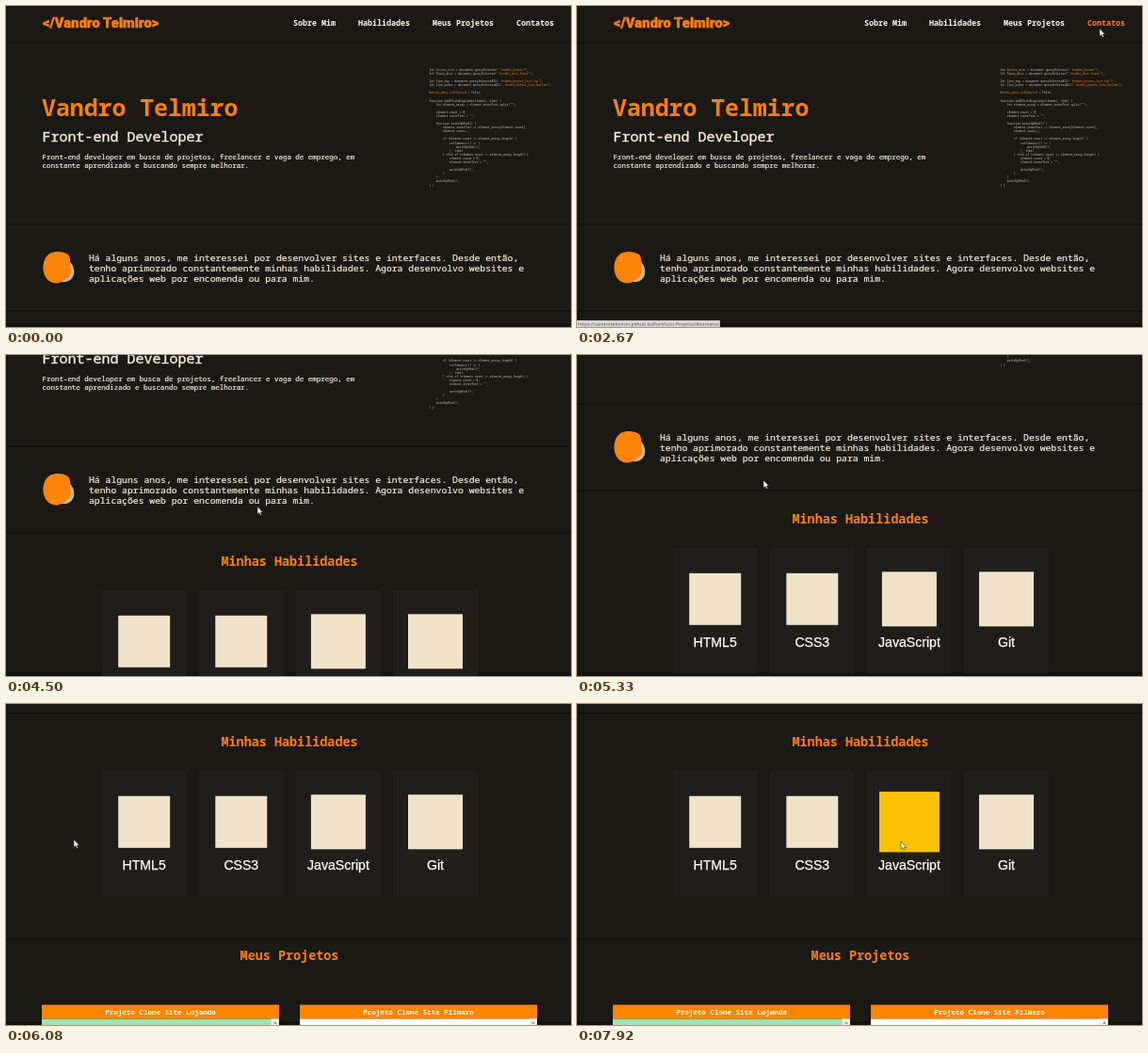
An HTML page that plays this animation: 600x341 px, repeating every 8 s.

```html
<!DOCTYPE html>
<html lang="pt-BR">
<head>
<meta charset="utf-8">
<title>Portfólio</title>
<style>
  html, body { margin: 0; width: 100%; height: 100%; overflow: hidden; background: #1a1914; }
  svg { display: block; width: 600px; height: 341px; }
  text { font-family: "Noto Sans Mono", monospace; fill: #f8ecd6; white-space: pre; }
  .logo { font: 900 14.6px Roboto, sans-serif; fill: #ff7f0a; stroke: #ff7f0a; stroke-width: .5; letter-spacing: .15px; }
  .nav text { font-size: 8.35px; font-weight: 700; fill: #fff8ea; }
  .nav .on { fill: #ff8110; }
  .name { font-size: 24.8px; font-weight: 600; fill: #ff7f0a; }
  .role, .desc, .about { stroke: #f8ecd6; stroke-width: .2; }
  .role { font-size: 15px; stroke-width: .4; }
  .desc { font-size: 7.48px; }
  .about { font-size: 9.75px; }
  .title { font-size: 13.45px; font-weight: 600; fill: #ff7f0a; text-anchor: middle; }
  .code text { font-size: 2.97px; fill: #c9c4b8; }
  .code .hot { fill: #e8872a; }
  .label { font: 14.1px "Liberation Sans", Arial, sans-serif; fill: #fff; stroke: #fff; stroke-width: .25; text-anchor: middle; }
  .bar { font-size: 7.55px; font-weight: 700; fill: #fff; text-anchor: middle; }
  .url { font: 5.2px "Open Sans", sans-serif; fill: #5c5c5c; }
  .rule { fill: #12110e; }
  .icon { transform-box: fill-box; transform-origin: center; }
</style>
</head>
<body>
<svg viewBox="0 0 600 341">
  <rect width="600" height="341" fill="#1a1914"/>
  <rect y="337" width="600" height="4" fill="#12110e"/>
  <g id="page">
    <rect class="rule" y="38" width="600" height="1.5"/>
    <rect class="rule" y="231" width="600" height="1.5"/>
    <rect class="rule" y="323" width="600" height="1.5"/>
    <rect class="rule" y="563" width="600" height="1.5"/>

    <text class="logo" x="39" y="23">&lt;/Vandro Telmiro&gt;</text>
    <g class="nav">
      <text x="305" y="21">Sobre Mim</text>
      <text x="374" y="21">Habilidades</text>
      <text x="453" y="21">Meus Projetos</text>
      <text x="542" y="21">Contatos</text>
    </g>

    <text class="name" x="38" y="116.5">Vandro Telmiro</text>
    <text class="role" x="38.5" y="144">Front-end Developer</text>
    <text class="desc" x="38.5" y="162.5">Front-end developer em busca de projetos, freelancer e vaga de emprego, em</text>
    <text class="desc" x="38.5" y="172">constante aprendizado e buscando sempre melhorar.</text>
    <g class="code" id="code"></g>

    <path fill="#bdb6a6" d="M50 268C57 264 67 268 71 276C74 283 72 291 64 293C54 294 45 289 45 280C45 275 46 271 50 268Z"/>
    <path fill="#ff840a" d="M47 262.5C53 260 61 260.5 66 264C70 269 67 275 69 281C69 287 64 290 58 293.5C51 296 45 293 42 288C38 281 38 268 47 262.5Z"/>
    <text class="about" x="88" y="270.7">Há alguns anos, me interessei por desenvolver sites e interfaces. Desde então,</text>
    <text class="about" x="88" y="281.9">tenho aprimorado constantemente minhas habilidades. Agora desenvolvo websites e</text>
    <text class="about" x="88" y="293.1">aplicações web por encomenda ou para mim.</text>

    <text class="title" x="301" y="358.7">Minhas Habilidades</text>
    <g id="skills"></g>
    <text class="title" x="301" y="585.7">Meus Projetos</text>
    <g id="projects"></g>
  </g>

  <g id="status">
    <rect y="334" height="7" fill="#d9d9d9"/>
    <text class="url" x="1" y="339.6"></text>
  </g>
  <g id="cursor" stroke="#222" stroke-width=".6" fill="#fff">
    <path id="arrow" d="M0 0V8.2L1.9 6.6L3.1 9.3L4.5 8.7L3.3 6.1H5.7Z"/>
    <path id="hand" d="M-.8 .6Q0 -.6 .8 .6V4L4.3 4.9Q5 5.2 4.8 6.4L4.1 10H-.6L-3 6.6Q-3.2 5.2 -2 5.6L-.8 6.6Z"/>
  </g>
</svg>
<script>
const NS = 'http://www.w3.org/2000/svg';
const $ = id => document.getElementById(id);

function add(parent, tag, attrs, text) {
  const el = document.createElementNS(NS, tag);
  for (const key in attrs) el.setAttribute(key, attrs[key]);
  if (text) el.textContent = text;
  return parent.appendChild(el);
}

// Code card
const code = `let botoes_menu = document.querySelector(".header_botoes");
let frase_desc = document.querySelector(".header_desc-frase");

let line_top = document.querySelectorAll(".header_botoes_line-top");
let line_under = document.querySelectorAll(".header_botoes_line-bottom");

botoes_menu.isSelected = false;

function addEfeitoDigitado(element, time) {
    let element_array = element.innerText.split("");

    element.count = 0;
    element.innerText = "";

    function writeUpHtml() {
        element.innerText += element_array[element.count];
        element.count++;

        if (element.count <= element_array.length) {
            setTimeout(() => {
                writeUpHtml();
            }, time)
        } else if (element.count >= element_array.length) {
            element.count = 0;
            element.innerText = "";

            writeUpHtml();
        }
    }
    writeUpHtml();
} }`;
code.split('\n').forEach((line, i) => {
  if (!line) return;
  const indent = line.search(/\S/);
  const text = add($('code'), 'text', { x: 449.5 + indent * 1.8, y: 68.8 + i * 4.09 });
  line.trim().split(/(botoes_menu\S*|"[^"]+")/).forEach((part, j) =>
    add(text, 'tspan', j % 2 ? { class: 'hot' } : {}, part));
});

// Skill cards: name, icon size, hover colour, hover start and end
const skills = [
  ['HTML5', 55, '#e8561f', 79, 88],
  ['CSS3', 55, '#2a78d0', 86, 94],
  ['JavaScript', 58, '#fdc203', 91, 110],
  ['Git', 58, '#e84e31', 200, 210],
].map(([name, size, color, from, to], i) => {
  const cx = 146.7 + i * 103.1;
  add($('skills'), 'rect', { x: cx - 45, y: 384.5, width: 90, height: 133.5, fill: '#1f1e1a' });
  const icon = add($('skills'), 'g', { class: 'icon' });
  const box = { x: cx - size / 2, y: 439.3 - size / 2, width: size, height: size };
  add(icon, 'rect', { ...box, fill: '#f0e3ca' });
  const tint = add(icon, 'rect', { ...box, fill: color });
  add($('skills'), 'text', { class: 'label', x: cx, y: 489.8 }, name);
  return { icon, tint, from, to };
});

// Project windows
[['Lojanda', 38, '#9fe3b4'], ['Filmaro', 312, '#fff']].forEach(([name, x, fill]) => {
  const g = add($('projects'), 'g', { transform: `translate(${x} 634)` });
  add(g, 'rect', { width: 252, height: 15, y: -.5, fill: '#ff8400' });
  add(g, 'text', { class: 'bar', x: 126, y: 10 }, `Projeto Clone Site ${name}`);
  add(g, 'rect', { y: 14.5, width: 252, height: 140, fill });
  add(g, 'rect', { x: 243.5, y: 14.5, width: 8.5, height: 140, fill: '#f1f1f1' });
  add(g, 'path', { d: 'M246 19.5l2 -2l2 2z', fill: '#777' });
});

// Timeline in ticks of 1/12 s
const RATE = 12, TICKS = 96;
const scrollKeys = [[43, 0], [45, 45], [49, 45], [50, 90], [52, 90], [54, 135],
  [56, 135], [58, 180], [66, 180], [68, 225], [69, 225], [73, 314]];
const cursorKeys = [[2, 212, 180], [6, 446, 96], [11, 338, 20], [13, 336, 21],
  [15, 345, 22], [17, 400, 20], [20, 480, 20], [24, 560, 19], [28, 566, 20],
  [31, 566, 20], [32, 555, 24], [45, 268, 158], [48, 268, 158], [49, 267, 161],
  [59, 267, 161], [64, 198, 133], [69, 110, 140], [73, 72, 144], [75, 72, 144],
  [85, 180, 146], [95, 344, 146]];
const linkStarts = [10, 16, 19, 23, 33];
const anchors = ['informacao', 'habilidades', 'projetos', 'contatos'];
const links = document.querySelectorAll('.nav text');
const [statusBox, statusText] = $('status').children;

const clamp = v => Math.max(0, Math.min(1, v));

function at(keys, k) {
  const i = keys.findIndex(key => key[0] > k);
  if (i === 0) return keys[0].slice(1);
  if (i < 0) return keys[keys.length - 1].slice(1);
  const a = keys[i - 1], b = keys[i], f = (k - a[0]) / (b[0] - a[0]);
  return a.slice(1).map((v, j) => v + (b[j + 1] - v) * f);
}

const linkAt = k => k < linkStarts[4] ? linkStarts.filter(s => s <= k).length - 1 : -1;
const show = (el, on) => el.setAttribute('visibility', on ? 'visible' : 'hidden');

function draw(k) {
  $('page').setAttribute('transform', `translate(0 ${-at(scrollKeys, k)[0]})`);

  const link = linkAt(k);
  links.forEach((el, i) => el.classList.toggle('on', i === link));

  const shown = linkAt(k - 2);
  show($('status'), shown >= 0);
  if (shown >= 0) {
    statusText.textContent = `https://vandrotelmiron.github.io/Portifolio-Projetos/#${anchors[shown]}`;
    statusBox.setAttribute('width', statusText.getComputedTextLength() + 2);
  }

  const hand = link >= 0 && k < 32;
  $('cursor').setAttribute('transform', `translate(${at(cursorKeys, k)})`);
  show($('arrow'), k >= 2 && !hand);
  show($('hand'), hand);

  for (const { icon, tint, from, to } of skills) {
    const on = clamp(Math.min(k - from, to - k) / 3);
    icon.style.transform = `scale(${1 + on * .1})`;
    tint.setAttribute('opacity', on);
  }
}

function frame() {
  draw(Math.floor(performance.now() / 1000 * RATE + .05) % TICKS);
  requestAnimationFrame(frame);
}
frame();
</script>
</body>
</html>
```
